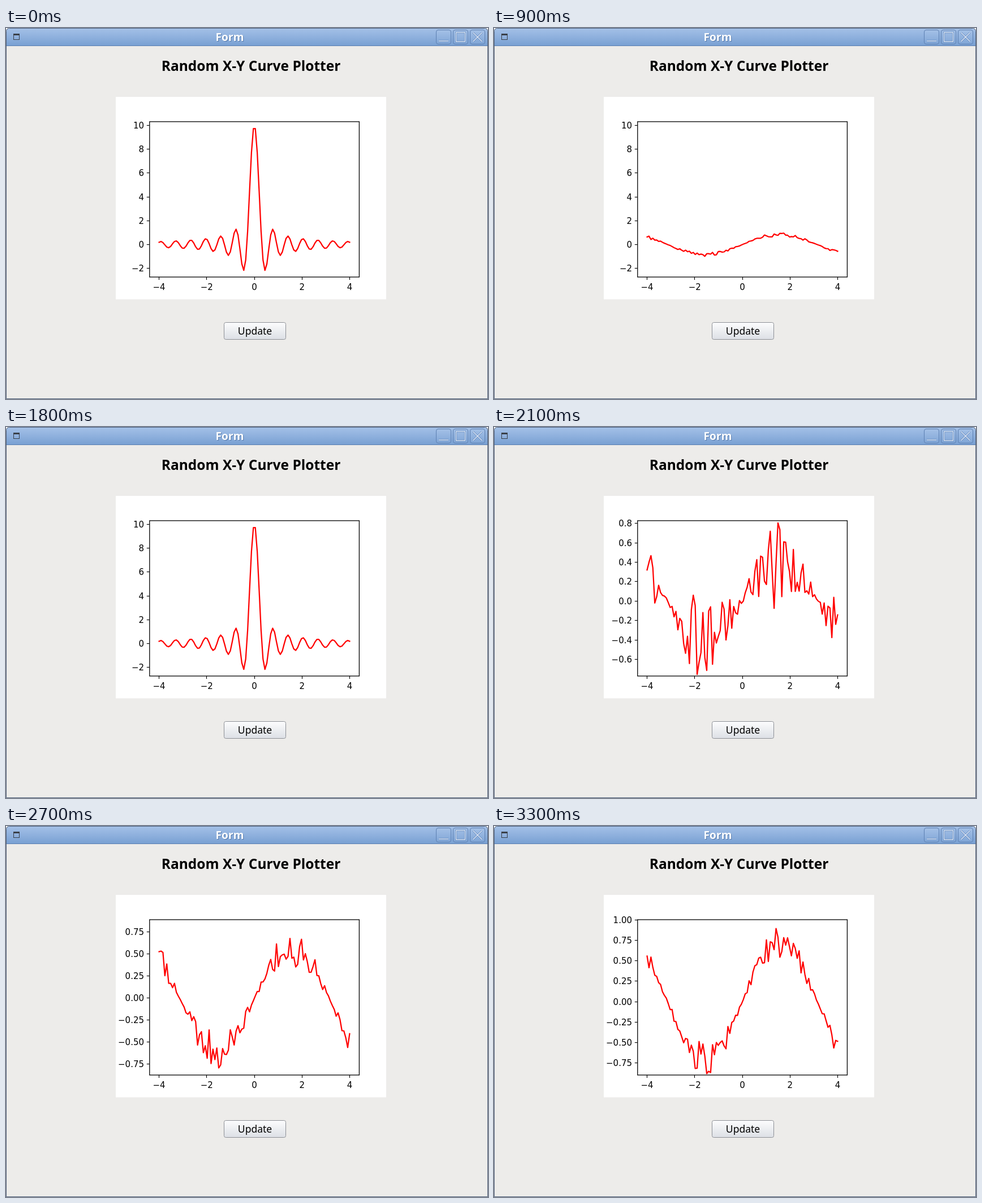
An HTML page with a canvas that plays this animation: 852 px wide and 657 px high, repeating every 3600 ms.

```html
<!DOCTYPE html>
<html lang="en">
<head>
<meta charset="utf-8">
<title>Form</title>
<style>
  html, body { margin: 0; width: 100%; height: 100%; overflow: hidden; background: #fff; }
  canvas { display: block; }
</style>
</head>
<body>
<canvas id="stage" width="852" height="657"></canvas>
<script>
const ctx = document.getElementById('stage').getContext('2d');
const STEP = 300, COUNT = 100;
const BOX = { left: 253.8, right: 624.4, top: 165.9, bottom: 441 };
const xAt = i => -4 + 8 * i / (COUNT - 1);
const xPos = x => 439 + x * 42.1;

// Vertical scale: pixel row of zero, pixels per unit, tick range and step, decimals
const axis = (zero, unit, from, to, step, digits) => ({ zero, unit, from, to, step, digits });
const WIDE = axis(383.4, 21.1, -2, 10, 2, 0);

function random(seed) {
  return () => {
    seed = seed + 0x6D2B79F5 | 0;
    let t = Math.imul(seed ^ seed >>> 15, 1 | seed);
    t = t + Math.imul(t ^ t >>> 7, 61 | t) ^ t;
    return ((t ^ t >>> 14) >>> 0) / 4294967296;
  };
}

const sample = f => Array.from({ length: COUNT }, (_, i) => f(xAt(i)));
const ripple = () => sample(x => Math.sin(10 * x) / x);

// Sine wave whose height is random at each point
function noisy(seed, low, high) {
  const next = random(seed);
  return sample(x => Math.sin(x) * (low + (high - low) * next()));
}

const plot = (scale, ys) => ({ scale, ys });
const plots = [
  plot(WIDE, ripple()),
  plot(WIDE, noisy(11, .4, 1)),
  plot(WIDE, noisy(23, .8, 1.4)),
  plot(WIDE, noisy(37, .65, 1)),
  plot(WIDE, noisy(41, .7, 1.5)),
  plot(WIDE, noisy(59, 1, 1.95)),
  plot(WIDE, ripple()),
  plot(axis(308.3, 171.8, -.6, .8, .2, 1), noisy(61, -.08, .84)),
  plot(axis(305.5, 93, -1, 1, .5, 1), noisy(67, .98, 1.37)),
  plot(axis(304.5, 156, -.75, .75, .25, 2), noisy(73, .35, .81)),
  plot(axis(305, 129.7, -1, 1, .25, 2), noisy(83, .9, 1)),
  plot(axis(311, 144.5, -.75, 1, .25, 2), noisy(97, .5, .92))
];

function fade(y0, y1, ...colors) {
  const g = ctx.createLinearGradient(0, y0, 0, y1);
  colors.forEach((c, i) => g.addColorStop(i / (colors.length - 1), c));
  return g;
}

function text(str, x, y, font, color = '#000', align = 'center') {
  ctx.font = font;
  ctx.fillStyle = color;
  ctx.textAlign = align;
  ctx.fillText(str, x, y);
}

function rounded(x, y, w, h, r, fill, stroke) {
  ctx.beginPath();
  ctx.roundRect(x, y, w, h, r);
  if (fill) { ctx.fillStyle = fill; ctx.fill(); }
  if (stroke) { ctx.strokeStyle = stroke; ctx.lineWidth = 1; ctx.stroke(); }
}

function line(points, color, width) {
  ctx.beginPath();
  points.forEach(([x, y]) => ctx.lineTo(x, y));
  ctx.strokeStyle = color;
  ctx.lineWidth = width;
  ctx.stroke();
}

function frame(x, y, w, h, color, width) {
  ctx.strokeStyle = color;
  ctx.lineWidth = width;
  ctx.strokeRect(x, y, w, h);
}

// A light stroke on top of a darker edge
function glyph(draw) {
  draw('#668bbf', 3);
  draw('#e6eef9', 1.3);
}

function drawWindow() {
  rounded(0, 0, 852, 657, [5, 5, 0, 0], '#edecea');
  rounded(1, 1, 850, 31, [4, 4, 0, 0], fade(1, 32, '#a3c0e7', '#8eb0dd', '#779fd2'));
  ctx.fillStyle = '#5c80b2';
  ctx.fillRect(1, 31, 850, 1);
  rounded(.5, .5, 851, 656, [5, 5, 0, 0], null, '#4d5e78');
  ctx.fillStyle = '#3a4049';
  ctx.fillRect(13, 10, 11, 3);
  frame(13.5, 10.5, 10, 10, '#3a4049', 1);

  const font = 'bold 19.2px "Noto Sans", sans-serif';
  text('Form', 396.5, 24, font, '#5478aa');
  text('Form', 395.5, 23, font, '#fff');

  for (const x of [760.5, 790.5, 820.5])
    rounded(x, 3.5, 26, 25, 3.5, fade(3, 29, '#a5c1e7', '#7fa5d6'), '#5d80b2');
  glyph((c, w) => line([[765, 23], [782, 23]], c, w));
  glyph((c, w) => frame(795.5, 8, 16, 16, c, w));
  glyph((c, w) => {
    line([[825.5, 8], [841.5, 24]], c, w);
    line([[841.5, 8], [825.5, 24]], c, w);
  });
}

function drawForm() {
  text('Random X-Y Curve Plotter', 433, 76, 'bold 24.5px "Noto Sans", sans-serif');
  ctx.fillStyle = '#fff';
  ctx.fillRect(194, 122, 478, 358.5);
  rounded(385.5, 521.5, 109, 30, 3, fade(521, 552, '#fdfdfe', '#eceef1', '#dcdfe5'), '#8d9096');
  text('Update', 440, 543, '17.5px "Noto Sans", sans-serif');
}

function drawPlot({ scale, ys }) {
  const yPos = y => scale.zero - y * scale.unit;
  const label = (v, digits) => (v < 0 ? '\u2212' : '') + Math.abs(v).toFixed(digits);
  const font = '15px "DejaVu Sans", sans-serif';

  for (let x = -4; x <= 4; x += 2) {
    const px = Math.floor(xPos(x)) + .5;
    line([[px, BOX.bottom], [px, BOX.bottom + 5]], '#000', 1.15);
    text(label(x, 0), xPos(x), 464, font);
  }
  const ticks = Math.round((scale.to - scale.from) / scale.step);
  for (let k = 0; k <= ticks; k++) {
    const v = Math.round((scale.from + k * scale.step) * 100) / 100;
    const py = Math.floor(yPos(v)) + .5;
    line([[BOX.left - 5, py], [BOX.left, py]], '#000', 1.15);
    text(label(v, scale.digits), 244, py + 5.5, font, '#000', 'right');
  }

  ctx.lineJoin = 'round';
  ctx.lineCap = 'square';
  line(ys.map((y, i) => [xPos(xAt(i)), yPos(y)]), '#f00', 2.25);
  ctx.lineCap = 'butt';
  ctx.lineJoin = 'miter';
  frame(BOX.left, BOX.top, BOX.right - BOX.left, BOX.bottom - BOX.top, '#000', 1.3);
}

function render(time) {
  ctx.clearRect(0, 0, 852, 657);
  drawWindow();
  drawForm();
  drawPlot(plots[Math.floor(time / STEP) % plots.length]);
}

const start = performance.now();
function loop() {
  render(performance.now() - start);
  requestAnimationFrame(loop);
}
loop();
</script>
</body>
</html>
```
